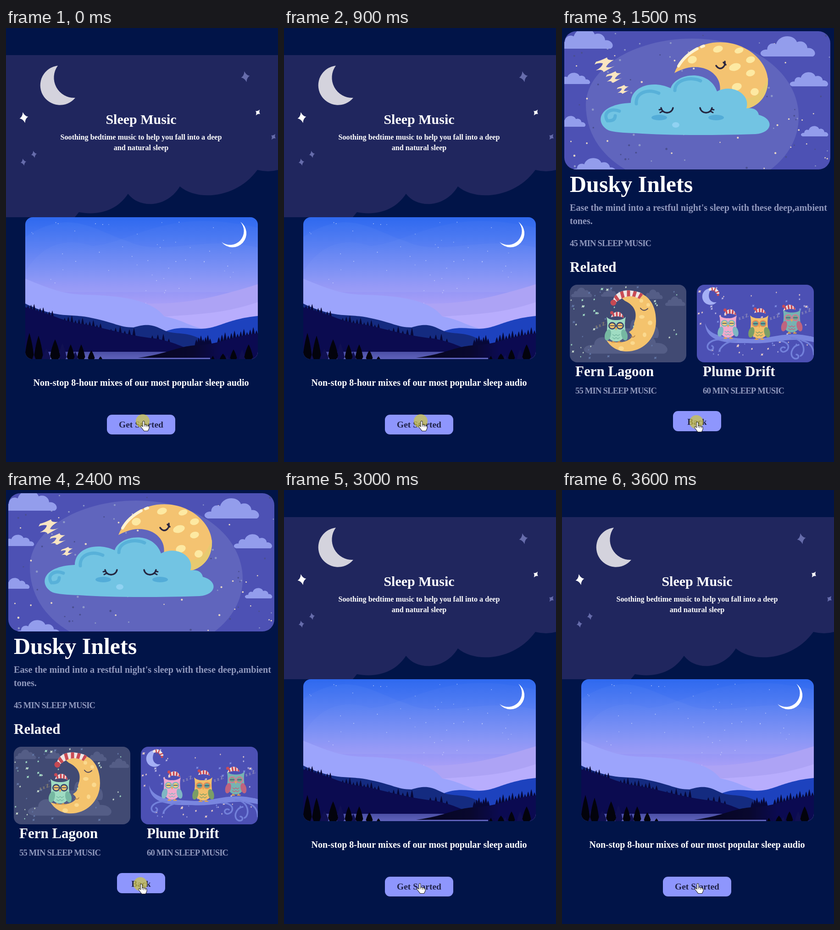
Animation, 593 px wide and 945 px high, one loop 4000 ms. Source, as an HTML page with a canvas:

```html
<!DOCTYPE html>
<html lang="en">
<head>
<meta charset="utf-8">
<style>
html, body { margin: 0; width: 100%; height: 100%; overflow: hidden; background: #011448; }
canvas { display: block; }
</style>
</head>
<body>
<canvas id="stage" width="593" height="945"></canvas>
<script>
const ctx = document.getElementById('stage').getContext('2d');
const NIGHT = '#011448', BUTTON = '#8e96fd', MUTED = '#9098bd', TAU = Math.PI * 2;

function fill(d, color) {
  ctx.fillStyle = color;
  ctx.fill(new Path2D(d));
}

function stroke(d, color, width) {
  ctx.strokeStyle = color;
  ctx.lineWidth = width;
  ctx.stroke(new Path2D(d));
}

function oval(x, y, rx, ry, color, turn = 0) {
  ctx.fillStyle = color;
  ctx.beginPath();
  ctx.ellipse(x, y, rx, ry, turn, 0, TAU);
  ctx.fill();
}

function box(x, y, w, h, r, color) {
  ctx.fillStyle = color;
  ctx.beginPath();
  ctx.roundRect(x, y, w, h, r);
  ctx.fill();
}

function text(str, x, y, size, color = '#fff', align = 'left', spacing = 0) {
  ctx.font = `bold ${size}px "Liberation Serif", serif`;
  ctx.letterSpacing = spacing + 'px';
  ctx.textAlign = align;
  ctx.fillStyle = color;
  ctx.fillText(str, x, y);
}

function gradient(x0, y0, x1, y1, ...stops) {
  const g = ctx.createLinearGradient(x0, y0, x1, y1);
  stops.forEach(([at, color]) => g.addColorStop(at, color));
  return g;
}

function framed(x, y, w, h, r, color, paint) {
  ctx.save();
  ctx.beginPath();
  ctx.roundRect(x, y, w, h, r);
  ctx.clip();
  ctx.fillStyle = color;
  ctx.fillRect(x, y, w, h);
  paint();
  ctx.restore();
}

function placed(x, y, scale, turn, paint) {
  ctx.save();
  ctx.translate(x, y);
  ctx.rotate(turn);
  ctx.scale(scale, scale);
  paint();
  ctx.restore();
}

function random(seed) {
  return () => (seed = (seed * 16807) % 2147483647) / 2147483647;
}

function sparkle(x, y, size, color, turn = -0.2) {
  placed(x, y, size, turn, () =>
    fill('M0-1Q.2-.2 .8 0Q.2.2 0 1Q-.2.2-.8 0Q-.2-.2 0-1Z', color));
}

function scatter(seed, count, x, y, w, h, paint) {
  const next = random(seed);
  for (let i = 0; i < count; i++) paint(x + next() * w, y + next() * h, next(), i);
}

function tree(x, top, bottom, w, color) {
  const h = bottom - top;
  fill(`M${x} ${top}Q${x + w * 0.3} ${top + h * 0.3} ${x + w / 2} ${bottom - h * 0.2}` +
       `L${x + w * 0.3} ${bottom}H${x - w * 0.3}L${x - w / 2} ${bottom - h * 0.2}` +
       `Q${x - w * 0.3} ${top + h * 0.3} ${x} ${top}Z`, color);
}

function treeLine(x0, y0, x1, y1, count) {
  for (let i = 0; i < count; i++) {
    const k = i / (count - 1), y = y0 + (y1 - y0) * k;
    tree(x0 + (x1 - x0) * k, y - 4 * (i * 7 % 3), y + 15, 7, '#070838');
  }
}

function puff(x, y, w, h, color) {
  ctx.save();
  ctx.translate(x, y);
  ctx.scale(w / 100, h / 40);
  fill('M6 40C-5 36 0 25 12 26C12 15 21 11 28 15C34-6 61-5 66 11C77 6 85 15 85 23C96 21 104 35 95 40Z', color);
  ctx.restore();
}

function pointer(x, y, halo) {
  if (halo) oval(...halo, 15, 15, 'rgba(210,200,60,.7)');
  placed(x, y, 0.93, 0, () => {
    const hand = new Path2D('M-2 2C-2-1 2-1 2 2V9Q5 7 6 10Q9 8 10 11Q13 10 13 13V17L10 23H1L-6 14' +
                            'C-8 11-5 9-2 13Z');
    ctx.fillStyle = '#fff';
    ctx.fill(hand);
    ctx.strokeStyle = '#222';
    ctx.lineWidth = 1.1;
    ctx.stroke(hand);
    stroke('M2 9V13M6 10V14M10 11V14', '#222', 1);
  });
}

function landscape() {
  fill('M42 455C140 390 190 440 265 464C340 500 430 450 549 478V575H42Z', 'rgba(255,255,255,.03)');
  fill('M42 530C80 470 130 455 190 475C290 462 350 390 549 435V575H42Z', 'rgba(255,255,255,.025)');
  scatter(77, 52, 56, 422, 440, 182, (x, y, r) => oval(x, y, 0.9, 0.9, `rgba(225,230,255,${0.4 + r * 0.4})`));
  fill('M511 422A30.4 30.4 0 1 1 470 466A30.2 30.2 0 0 0 511 422Z', '#fff');

  fill('M300 600C400 602 460 585 549 558V670H330Z', '#ada3f5');
  fill('M335 629C430 623 480 620 549 597V670H345Z', '#b8adfd');
  fill('M42 546C105 571 125 580 180 581C250 583 318 592 345 628C385 635 400 650 435 656V700H42Z', '#9ca4fc');
  fill('M345 662C375 648 400 655 425 655C465 654 480 634 549 627V700H345Z', '#1d42be');
  fill('M42 600C115 635 140 620 190 632C235 641 248 652 278 652C320 638 332 655 355 662C380 667 400 662 430 681L400 712H42Z', '#142b80');
  treeLine(48, 604, 101, 623, 9);
  treeLine(128, 631, 206, 647, 11);
  treeLine(229, 655, 279, 661, 6);
  treeLine(319, 669, 355, 676, 4);
  fill('M42 608C110 626 122 639 170 645C220 654 270 671 325 676C375 685 390 699 420 706V721H42Z', '#0b0b50');
  box(85, 705, 370, 16, 0, gradient(0, 705, 0, 721, [0, '#4b4fa5'], [1, '#5f62bb']));
  treeLine(415, 678, 445, 676, 7);
  treeLine(464, 673, 546, 658, 13);
  fill('M288 718C355 710 370 692 425 690C475 686 490 671 549 665V721H445V718Z',
       gradient(290, 0, 470, 0, [0, '#05051f'], [0.65, '#09082e'], [1, '#0b0a51']));

  [[62, 697, 16], [88, 698, 18], [123, 686, 18], [151, 705, 12], [515, 700, 14], [482, 712, 9]]
    .forEach(([x, y, w]) => tree(x, y, 724, w, '#101052'));
  [[51, 664, 19], [71, 670, 19], [107, 678, 22], [141, 689, 17], [164, 689, 17], [186, 702, 15],
   [206, 715, 8], [451, 714, 7], [473, 709, 14], [496, 700, 15], [529, 689, 19]]
    .forEach(([x, y, w]) => tree(x, y, 723, w, '#03030c'));
}

function welcome(withHalo) {
  fill('M0 59H593V309Q572 315 548 309C505 369 420 379 379 345C350 393 290 393 266 361' +
       'C242 398 200 409 159 401L150 412H0Z', '#20265e');
  fill('M113 82A43 43 0 1 0 151 152A44 44 0 0 1 113 82Z', '#d4d3dd');
  sparkle(39, 195, 12, '#fff');
  sparkle(549, 184, 7.5, '#fff', 0.6);
  sparkle(522, 106, 12, '#666cab');
  sparkle(583, 237, 7.5, '#666cab', 0.6);
  sparkle(61, 275, 8, '#666cab');
  sparkle(38, 292, 8, '#666cab');
  text('Sleep Music', 294.5, 209, 30, '#fff', 'center');
  text('Soothing bedtime music to help you fall into a deep', 294.5, 243, 16.2, '#fff', 'center');
  text('and natural sleep', 294.5, 266, 16.2, '#fff', 'center');

  const sky = gradient(0, 412, 0, 660, [0, '#2e69ef'], [0.2, '#4b78f2'], [0.6, '#8e94f6'], [0.85, '#b5a4f7'], [1, '#bba9fb']);
  framed(42, 412, 507, 309, 16, sky, landscape);
  text('Non-stop 8-hour mixes of our most popular sleep audio', 294.5, 779, 20, '#fff', 'center');
  box(220, 842, 149, 43, 11, BUTTON);
  text('Get Started', 294.5, 870, 19.5, '#20234a', 'center');
  if (withHalo) pointer(300, 856, [298, 856]);
  else pointer(296, 857);
}

function closedEye(x, y, side) {
  stroke(`M${x - 13} ${y - 5}C${x - 10} ${y + 9} ${x + 10} ${y + 9} ${x + 13} ${y - 5}`, '#242640', 3.5);
  stroke(`M${x + 12 * side} ${y - 2}l${5 * side} 1M${x + 9 * side} ${y + 2}l${6 * side} 3`, '#242640', 3);
}

function sleepyCloud() {
  fill('M52 167C52 90 155 23 284 23C420 23 516 100 516 194C516 240 492 280 455 308H138C82 275 52 225 52 167Z', '#6065bd');
  scatter(4211, 115, 8, 10, 575, 296, (x, y, r, i) =>
    oval(x, y, 1.2 + r * 1.2, 1.2 + r * 1.2, ['#e9d8c5', '#8d97c8', '#4a4f91'][i % 3]));
  [[-8, 2, 120, 43], [433, 19, 120, 43], [497, 97, 84, 30], [-8, 98, 70, 24],
   [-12, 192, 64, 23], [521, 214, 60, 22], [21, 284, 98, 34]]
    .forEach(c => puff(...c, '#939dec'));
  [[93, 79, 1], [113, 106, 0.8], [133, 133, 0.62]].forEach(([x, y, s]) => placed(x, y, s, 0.02, () =>
    fill('M-19-5Q-8-8 5-15Q4-8 20-10Q6-2 3 6Q13 8 22 3Q10 10-2 17Q-4 10-19 14Q-5 6-4-2Q-12-4-22 1Z', '#f9e5c1')));

  fill('M245 98C262 55 300 31 345 31C405 31 449 75 449 115C449 145 432 168 403 176L343 145' +
       'C352 110 325 85 290 85C270 85 255 93 245 98Z', '#f4c371');
  fill('M449 108C451 145 432 168 403 176L380 150C415 160 435 145 449 108Z', '#e8ca70');
  [[284, 69, 10, 8], [340, 46, 11, 7], [386, 49, 10, 6], [411, 69, 10, 7], [377, 85, 13, 8],
   [381, 128, 11, 8], [420, 139, 9, 8], [411, 98, 10, 7]]
    .forEach(([x, y, rx, ry]) => oval(x, y, rx, ry, '#fde9a2', -0.3));
  ctx.lineCap = 'round';
  stroke('M254 83Q267 60 295 45M304 41L309 39', '#fff3d2', 6);
  stroke('M336 82C344 94 357 86 355 73M352 75L357 80', '#2b263f', 3.5);

  fill('M102 223C72 208 76 166 150 163C150 128 195 112 237 131C248 98 320 88 338 138' +
       'C372 120 412 145 402 175C417 173 427 178 429 189' +
       'C463 198 460 228 422 231Q260 236 160 229Q117 228 102 223Z', '#72c4e3');
  stroke('M99 202C88 185 106 173 125 181M102 202Q116 202 116 191M162 165C160 142 185 131 211 142' +
         'M246 136C246 112 282 105 302 115', '#58b1d9', 7);
  closedEye(229, 179, -1);
  closedEye(314, 179, 1);
  oval(212, 195, 17, 6, '#53acd8');
  oval(336, 195, 17, 6, '#53acd8');
  oval(248, 211, 8, 6, '#90d2f2');
}

function nightcap(x, y, scale, turn = 0) {
  placed(x, y, scale, turn, () => {
    const cap = new Path2D('M-14 3C-10-13 8-15 14 2Q0-3-14 3Z');
    ctx.save();
    ctx.fillStyle = '#eee5e4';
    ctx.fill(cap);
    ctx.clip(cap);
    stroke('M-11-10L-7 6M-3-14L-1 4M5-14L5 4M12-11L11 5', '#c94b57', 4);
    ctx.restore();
    oval(-13, -7, 3.5, 3.5, '#c94b57');
  });
}

function owl(x, y, scale, body, wing, iris, rings = '#39436b') {
  placed(x, y, scale, 0, () => {
    stroke('M-7 25V31M7 25V31M-10 31H-3M4 31H11', '#e0a350', 2.5);
    fill('M-22-27Q-14-19 0-20Q14-19 22-27Q19-14 21 2C24 38-24 38-21 2Q-19-14-22-27Z', body);
    oval(-19, 14, 7, 13, wing, 0.25);
    oval(19, 14, 7, 13, wing, -0.25);
    for (const side of [-1, 1]) {
      oval(side * 9, -7, 9, 8.5, rings);
      oval(side * 9, -7, 6.2, 5.7, iris);
      stroke(`M${side * 9 - 5}-7H${side * 9 + 5}`, '#39436b', 1.6);
    }
    fill('M-3-3H3L0 4Z', '#eba84d');
    stroke('M-8 13l4 3 4-3 4 3 4-3M-8 20l4 3 4-3 4 3 4-3', wing, 1.5);
  });
}

function snore(x, y, color) {
  placed(x, y, 1, -0.35, () => text('z z Z', 0, 0, 11, color));
}

function moonCard() {
  [[20, 566, 46, 20], [85, 569, 38, 16], [178, 570, 42, 20], [225, 585, 44, 20], [48, 655, 184, 54], [140, 615, 72, 60]]
    .forEach(c => puff(...c, '#545d86'));
  scatter(903, 62, 19, 562, 250, 164, (x, y, r, i) =>
    sparkle(x, y, 1.8 + r * 2.6, ['#9fdac4', '#6175a5', '#c2d5ca'][i % 3], r));
  fill('M126 585C160 562 205 580 205 638C205 704 125 726 97 680C121 689 145 684 153 672' +
       'L151 667L146 662Q159 654 157 643C166 620 158 604 137 594Z', '#f4c36d');
  [[188, 603], [192, 642], [174, 629], [180, 668], [154, 686], [129, 698], [173, 594]]
    .forEach(([x, y], i) => oval(x, y, 4 + i % 3, 4 + i % 2, '#fbd98e'));
  stroke('M171 610Q178 619 187 611', '#4b4358', 2);
  stroke('M150 672Q156 675 159 670', '#b98249', 1.5);

  const hat = new Path2D('M111 595C114 574 137 568 158 573Q172 575 177 580L169 590Q145 575 118 597Z');
  ctx.save();
  ctx.fillStyle = '#eee5e4';
  ctx.fill(hat);
  ctx.clip(hat);
  stroke('M114 581L124 595M129 571L134 590M145 568L145 586M161 569L156 586M176 574L167 591', '#c94b54', 7);
  ctx.restore();
  oval(112, 598, 6.5, 6.5, '#c74953');
  owl(118, 655, 0.95, '#9fdcc2', '#76b8a2', '#efc268');
  nightcap(121, 628, 1, 0.08);
  snore(74, 654, '#938870');
}

function owlCard() {
  scatter(558, 64, 297, 562, 249, 150, (x, y, r, i) =>
    sparkle(x, y, 1.8 + r * 2.4, ['#e5c9c7', '#7b89df', '#b8b5e2'][i % 3], r));
  fill('M326 567A18 18 0 1 0 337 597C322 600 314 583 326 567Z', '#a5b0f5');
  stroke('M323 569Q334 564 340 577', '#eee5e4', 6);
  stroke('M327 566L328 572M334 567L332 573M341 574L335 576', '#c94b54', 2.5);
  oval(340, 581, 2.5, 2.5, '#c94b54');

  fill('M312 643C322 674 360 674 410 677C458 678 486 657 549 673V684C488 670 462 690 405 686C350 687 314 681 312 643Z', '#7986df');
  stroke('M350 679C325 676 312 690 319 699C326 706 334 696 327 692M380 681Q356 682 344 700' +
         'M470 681C505 682 494 707 481 705C472 701 479 692 486 696M500 675C530 676 532 708 520 714' +
         'M516 690C500 692 494 716 508 720C518 721 517 711 511 711M523 680C543 686 548 696 549 711', '#7280da', 3.5);
  owl(362, 649, 0.86, '#f1a9cc', '#7fb7c4', '#efcc79', '#78b6bc');
  owl(430, 650, 0.9, '#f2c06b', '#7b9e66', '#65a897', '#e58d59');
  owl(501, 637, 0.88, '#76b3b2', '#bf647f', '#70a692', '#d17b93');
  nightcap(367, 622, 0.95, 0.1);
  nightcap(432, 619, 0.9, 0.1);
  nightcap(496, 612, 0.95, -0.05);
  snore(386, 636, '#9691bb');
  snore(454, 636, '#9691bb');
  snore(523, 624, '#9691bb');
}

function details() {
  ctx.lineCap = 'butt';
  framed(5, 7, 580, 301, 26, '#4d51b4', sleepyCloud);
  ctx.lineCap = 'round';
  text('Dusky Inlets', 17, 357, 50);
  text("Ease the mind into a restful night's sleep with these deep,ambient", 17, 398, 20.2, MUTED);
  text('tones.', 17, 427, 20.2, MUTED);
  text('45 MIN SLEEP MUSIC', 17, 475, 18.6, MUTED, 'left', -0.8);
  text('Related', 17, 531, 31);
  framed(17, 559, 254, 169, 16, '#414a73', moonCard);
  framed(294, 559, 255, 169, 16, '#4c50b4', owlCard);
  text('Fern Lagoon', 29, 758, 31);
  text('Plume Drift', 307, 758, 31);
  text('55 MIN SLEEP MUSIC', 29, 796, 18.6, MUTED, 'left', -0.8);
  text('60 MIN SLEEP MUSIC', 307, 796, 18.6, MUTED, 'left', -0.8);
  box(242, 834, 105, 44, 11, BUTTON);
  text('Back', 294.5, 864, 19.5, '#20234a', 'center');
  pointer(295, 858, [293, 858]);
}

const scenes = [() => welcome(true), details, () => welcome(false)];
const start = performance.now();
let shown = -1;

function draw() {
  const t = (performance.now() - start) % 4000;
  const scene = t < 1500 ? 0 : t < 3000 ? 1 : 2;
  if (scene !== shown) {
    shown = scene;
    ctx.fillStyle = NIGHT;
    ctx.fillRect(0, 0, 593, 945);
    scenes[scene]();
  }
  requestAnimationFrame(draw);
}
draw();
</script>
</body>
</html>
```
